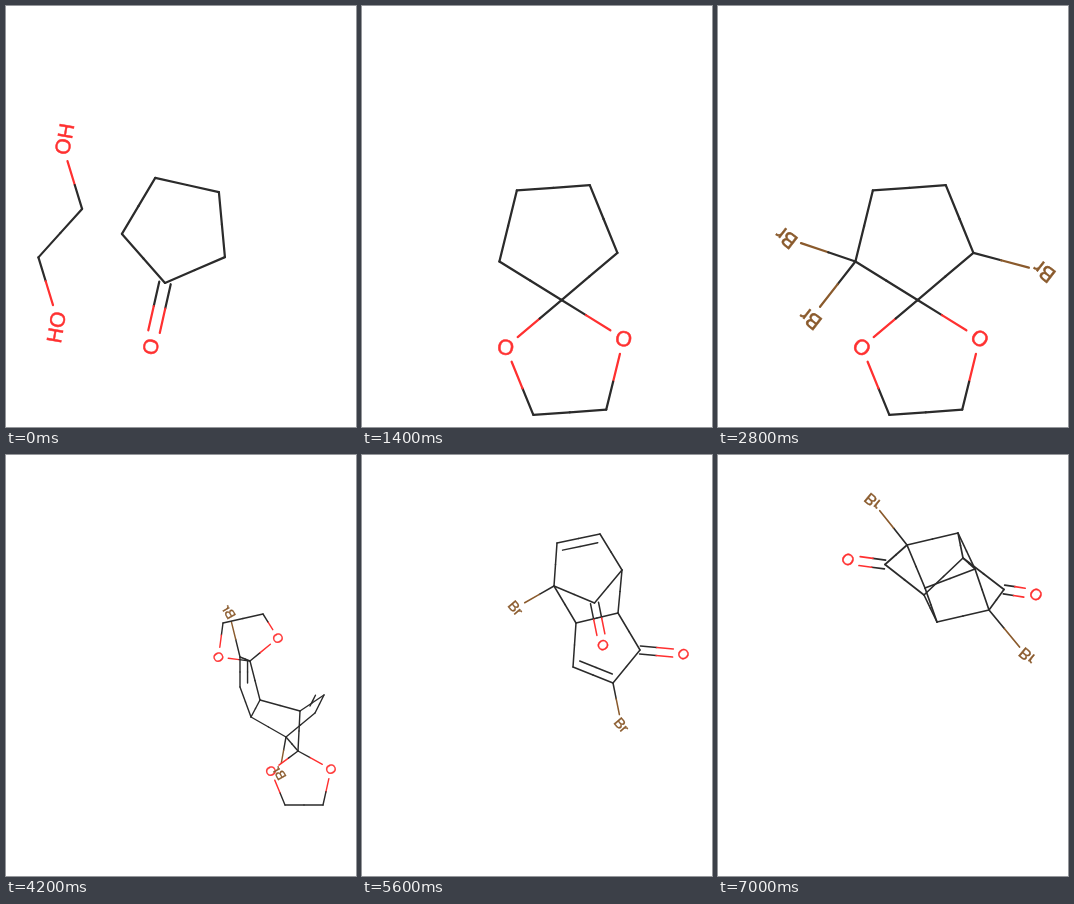
An HTML page for the animation above (8000 ms loop, 350x421 px).

```html
<!DOCTYPE html>
<html lang="en">
<head>
<meta charset="utf-8">
<title>Reaction steps</title>
<style>
html, body { margin: 0; width: 100%; height: 100%; overflow: hidden; background: #fff; }
svg { display: block; width: 350px; height: 421px; }
line { stroke-linecap: round; }
text { font-family: "Liberation Sans", Arial, sans-serif; text-anchor: middle; }
</style>
</head>
<body>
<svg id="stage" viewBox="0 0 350 421"></svg>
<script>
const STEP = 1400, LOOP = 8000;
const CARBON = '#2b2b2b';
const COLORS = { O: '#ff3030', OH: '#ff3030', HO: '#ff3030', Br: '#8a5a2c' };
const SHIFT = { OH: 0.36, HO: -0.36 }; // keeps the O of a hydroxyl on its atom

const hop = ([x, y], deg, len) => {
  const a = deg * Math.PI / 180;
  return [x + len * Math.cos(a), y + len * Math.sin(a)];
};
const ring = (center, r, deg) => [0, 1, 2, 3, 4].map(i => hop(center, deg + 72 * i, r));
const side = r => 2 * r * Math.sin(Math.PI / 5);

// Atoms in lower case are carbons, others show their label.
// Bonds: "-" single, "=" double, ">" double with its second line on the right.
function ketoneAndDiol() {
  const r = 55.5, tilt = 102.7;
  const [a, b, c, d, e] = ring([171.2, 222.8], r, tilt);
  const len = side(r);
  const OH = [57, 140.5], f = hop(OH, 73, len), g = hop(f, 132, len);
  return {
    size: 21, turn: -80,
    atoms: { a, b, c, d, e, f, g, OH, HO: hop(g, 73, len), O1: hop(a, tilt, len) },
    bonds: 'a-b-c-d-e-a=O1 OH-f-g-HO'
  };
}

function ketal() {
  const r = 62.2, tilt = 85.8, center = [195, 232];
  const [a, b, c, d, e] = ring(center, r, tilt);
  const [, O1, f, g, O2] = ring(hop(center, tilt, 2 * r), r, tilt + 180);
  return {
    size: 21.5, turn: 12,
    atoms: { a, b, c, d, e, f, g, O1, O2 },
    bonds: 'a-b-c-d-e-a-O1-f-g-O2-a'
  };
}

function tribromide() {
  const base = ketal(), { b, e } = base.atoms, len = side(62.2);
  const Br1 = hop(b, 198.7, len), Br2 = hop(b, 128, len), Br3 = hop(e, 15, len);
  return {
    size: 21.5, turn: 218,
    atoms: { ...base.atoms, Br1, Br2, Br3 },
    bonds: base.bonds + ' Br1-b-Br2 e-Br3'
  };
}

const dimer = {
  size: 13.5, turn: 240, mirror: true,
  atoms: {
    a: [234, 202], b: [234, 232], c: [245, 262], d: [254, 245], e: [244, 206],
    f: [257, 159], g: [217, 168], h: [280, 282], i: [292, 296], j: [294, 256],
    k: [318, 240], l: [309, 258], m: [317, 350], n: [279, 350],
    O1: [272, 183], O2: [212.5, 202], O3: [325, 314], O4: [265, 316],
    Br1: [223, 157], Br2: [273.5, 318]
  },
  bonds: 'e-a-Br1 b>a b-c-d-e-O1-f-g-O2-e c-h-i-j-d j-k>l-h-Br2 i-O3-m-n-O4-i'
};

const dienone = {
  size: 14.5, turn: 50,
  atoms: {
    a: [195, 88], b: [238, 79], c: [260, 115], d: [232.5, 148], e: [192, 131],
    f: [214, 168], g: [211, 212], h: [251, 228], i: [278, 195], j: [256, 158],
    O1: [241, 190], O2: [321.5, 199], Br1: [153.5, 153], Br2: [259.5, 270]
  },
  bonds: 'a>b-c-d-e-a e-f-j-c f-g h>g h-i-j d=O1 i=O2 e-Br1 h-Br2'
};

const cage = {
  size: 16, turn: 40, mirror: true,
  atoms: {
    a: [189, 90], b: [240, 78], c: [245, 103], d: [206, 140], e: [167, 109.5],
    f: [257, 114], g: [286, 134.5], h: [271, 155], i: [207, 133], j: [219, 167],
    O1: [130, 104.5], O2: [318, 139.5], Br1: [154.5, 46.5], Br2: [309, 201]
  },
  bonds: 'a-b-c-d-e-a-i-j-h-g-c-f-b f-i f-h d-j e=O1 g=O2 a-Br1 h-Br2'
};

function add(parent, tag, attrs) {
  const el = document.createElementNS('http://www.w3.org/2000/svg', tag);
  for (const key in attrs) el.setAttribute(key, attrs[key]);
  return parent.appendChild(el);
}

const labelOf = name => name.replace(/\d/, '');
const colorOf = name => COLORS[labelOf(name)] || CARBON;

// Draws one line, moved sideways; each half takes the colour of its atom.
function drawLine(group, { atoms, size }, from, to, offset, inset = 0) {
  const [x1, y1] = atoms[from], [x2, y2] = atoms[to];
  const len = Math.hypot(x2 - x1, y2 - y1);
  const ux = (x2 - x1) / len, uy = (y2 - y1) / len;
  const trim = name => inset + (COLORS[labelOf(name)] ? size * 0.73 : 0);
  const at = s => [x1 + ux * s - uy * offset, y1 + uy * s + ux * offset];
  const s = trim(from), e = len - trim(to), mid = at((s + e) / 2);
  for (const [name, p] of [[from, at(s)], [to, at(e)]]) {
    add(group, 'line', { x1: p[0], y1: p[1], x2: mid[0], y2: mid[1], stroke: colorOf(name) });
  }
}

function drawBond(group, mol, from, kind, to) {
  const gap = mol.size * 0.56;
  if (kind === '=') {
    drawLine(group, mol, from, to, gap / 2);
    drawLine(group, mol, from, to, -gap / 2);
  } else {
    drawLine(group, mol, from, to, 0);
    if (kind === '>') drawLine(group, mol, from, to, gap, 4);
  }
}

function build(mol) {
  const { size, turn, mirror, atoms, bonds } = mol;
  const group = add(stage, 'g', { 'stroke-width': size * 0.105, 'font-size': size });
  for (const chain of bonds.split(' ')) {
    const parts = chain.split(/([-=>])/);
    for (let i = 0; i + 2 < parts.length; i += 2) drawBond(group, mol, ...parts.slice(i, i + 3));
  }
  for (const name in atoms) {
    const text = labelOf(name), color = COLORS[text];
    if (!color) continue;
    const [x, y] = atoms[name];
    add(group, 'text', {
      x: size * (SHIFT[text] || 0), y: size * 0.35,
      fill: color, stroke: color, 'stroke-width': size * 0.025,
      transform: `translate(${x} ${y}) rotate(${turn}) scale(1 ${mirror ? -1 : 1})`
    }).textContent = text;
  }
  return group;
}

const stage = document.getElementById('stage');
const groups = [ketoneAndDiol(), ketal(), tribromide(), dimer, dienone, cage].map(build);
const start = performance.now();

function draw() {
  const t = (performance.now() - start) % LOOP;
  const current = Math.min(groups.length - 1, Math.floor(t / STEP));
  groups.forEach((g, i) => { g.style.display = i === current ? '' : 'none'; });
  requestAnimationFrame(draw);
}
draw();
</script>
</body>
</html>
```
